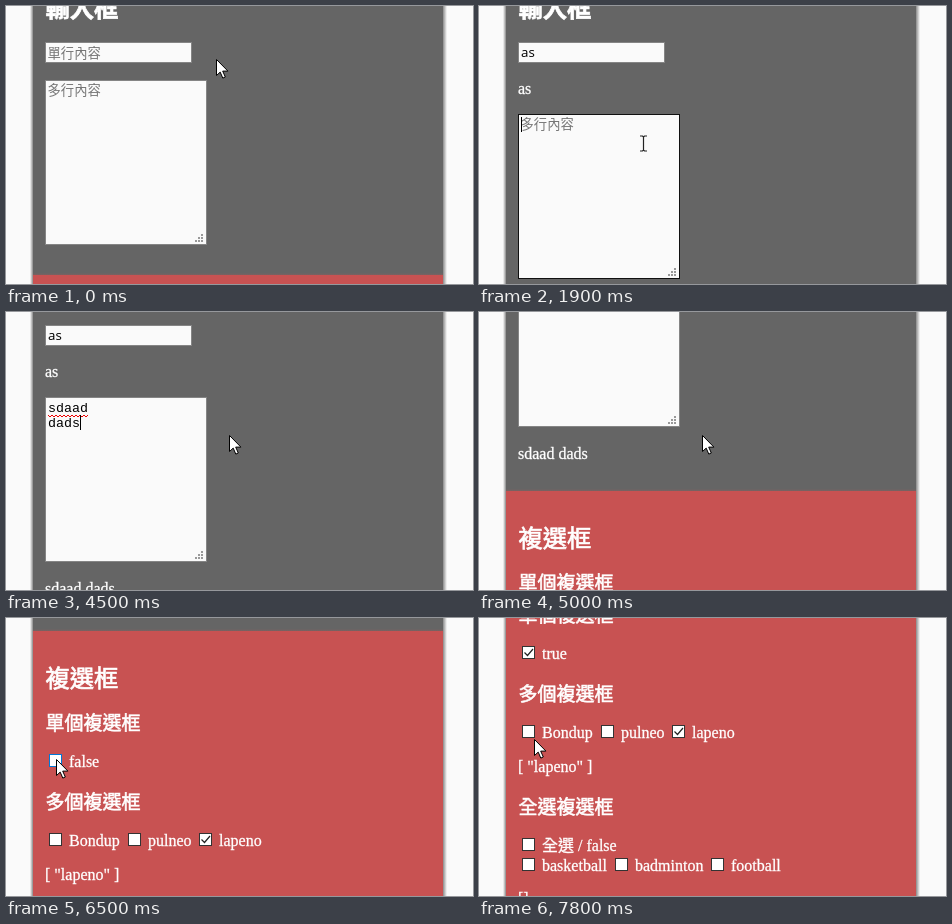
These frames come from a looping animation (467x278 px, 8000 ms). An HTML page:

```html
<!DOCTYPE html>
<html lang="zh-Hant">
<head>
<meta charset="utf-8">
<style>
html, body { margin: 0; width: 100%; height: 100%; overflow: hidden; background: #fafafa; }
svg { display: block; width: 467px; height: 278px; }
text { font: 16px 'Liberation Serif', 'Noto Sans CJK TC', 'Noto Sans CJK', serif; fill: #fff; stroke: #fff; stroke-width: .3px; white-space: pre; }
.h1 { font-size: 24.3px; stroke-width: .7px; }
.h3 { font-size: 19px; stroke-width: .6px; }
.hint { font: 13.33px 'Noto Sans CJK TC', 'Noto Sans CJK', sans-serif; fill: #757575; stroke: none; }
.one { font: 13.33px 'Open Sans', 'Noto Sans', sans-serif; fill: #000; stroke: none; }
.mono { font: 13.333px 'Liberation Mono', monospace; fill: #000; stroke: none; }
.field { fill: #fafafa; stroke: #858585; }
.box { fill: #fff; stroke: #333; }
.tick { fill: none; stroke: #222; stroke-width: 1.2; }
</style>
</head>
<body>
<svg viewBox="0 0 467 278">
  <defs>
    <linearGradient id="left"><stop offset="0" stop-color="#000" stop-opacity="0"/><stop offset="1" stop-color="#000" stop-opacity=".45"/></linearGradient>
    <linearGradient id="right"><stop offset="0" stop-color="#000" stop-opacity=".45"/><stop offset="1" stop-color="#000" stop-opacity="0"/></linearGradient>
    <linearGradient id="seam" x2="0" y2="1"><stop offset="0" stop-color="#c85252" stop-opacity="0"/><stop offset="1" stop-color="#c85252" stop-opacity=".25"/></linearGradient>
  </defs>
  <rect x="24" width="3" height="278" fill="url(#left)"/>
  <rect x="437" width="4" height="278" fill="url(#right)"/>
  <rect x="27" width="410" height="278" fill="#656565"/>
  <g id="page">
    <text class="h1" x="39.5" y="11" style="font-weight:600">輸入框</text>
    <rect id="input" class="field" x="39.5" y="36.5" width="146" height="20"/>
    <text id="inputHint" class="hint" x="41.5" y="52">單行內容</text>
    <text id="inputText" class="one" x="42" y="51"></text>
    <rect id="inputCaret" y="40" width="1" height="14"/>
    <text id="echo1" x="39" y="88"></text>
    <g id="area">
      <rect id="areaBox" class="field" x="39.5" y="74.5" width="161" height="164"/>
      <g id="grip" fill="#999"></g>
      <text id="areaHint" class="hint" x="41.5" y="89">多行內容</text>
      <text id="line1" class="mono" x="42" y="89"></text>
      <text id="line2" class="mono" x="42" y="104"></text>
      <path id="wave" fill="none" stroke="#e00" stroke-width="1"/>
      <rect id="areaCaret" width="1" height="15"/>
    </g>
    <text id="echo2" x="39" y="305"></text>
    <g id="red">
      <rect x="27" y="335" width="410" height="2" fill="url(#seam)"/>
      <rect x="27" y="337" width="410" height="500" fill="#c85252"/>
      <text class="h1" x="39.5" y="393">複選框</text>
      <text class="h3" x="39.5" y="436">單個複選框</text>
      <text id="single" x="63" y="473"></text>
      <text class="h3" x="39.5" y="514.5">多個複選框</text>
      <text x="39" y="586">[ "lapeno" ]</text>
      <text class="h3" x="39.5" y="627.5">全選複選框</text>
      <text x="39" y="718">[]</text>
    </g>
  </g>
  <path id="arrow" d="M0 0V16L3.7 12.6 6.3 18.6 8.8 17.5 6.2 11.6H11.4Z" fill="#fff" stroke="#000"/>
  <path id="beam" d="M-3.5-7.5H-1L0-6.5 1-7.5H3.5M0-6.5V6.5M-3.5 7.5H-1L0 6.5 1 7.5H3.5" fill="none" stroke="#222" stroke-width="1.2"/>
</svg>
<script>
const LOOP = 8000, STEP = 100, PARA = 34;
const $ = id => document.getElementById(id);

function add(parent, tag, attrs, text) {
  const el = document.createElementNS('http://www.w3.org/2000/svg', tag);
  for (const k in attrs) el.setAttribute(k, attrs[k]);
  if (text) el.textContent = text;
  return parent.appendChild(el);
}
const move = (el, x, y) => el.setAttribute('transform', `translate(${x} ${y})`);
const show = (el, on) => el.setAttribute('visibility', on ? 'visible' : 'hidden');

function checkbox(x, base, label, on) {
  const red = $('red');
  const box = add(red, 'rect', { class: 'box', x: x + .5, y: base - 12.5, width: 12, height: 12 });
  const tick = add(red, 'path', { class: 'tick', d: `M${x + 2.5} ${base - 6.5}l3 3 5.5-6.5` });
  show(tick, on);
  if (label) add(red, 'text', { x: x + 20, y: base }, label);
  return { box, tick };
}

const single = checkbox(43, 473);
checkbox(43, 552, 'Bondup');
checkbox(122, 552, 'pulneo');
checkbox(193, 552, 'lapeno', true);
checkbox(43, 665, '全選 / false');
checkbox(43, 685, 'basketball');
checkbox(136, 685, 'badminton');
checkbox(232, 685, 'football');

for (let r = 0; r < 3; r++)
  for (let c = 2 - r; c < 3; c++)
    add($('grip'), 'rect', { x: 189 + c * 3, y: 228 + r * 3, width: 2, height: 2 });

let zig = 'M42 92';
for (let i = 0; i < 20; i++) zig += `l2 ${i % 2 ? -2 : 2}`;
$('wave').setAttribute('d', zig);

// keys: [time, value, ...]
function track(keys, t) {
  let i = 0;
  while (i < keys.length - 2 && t >= keys[i + 1][0]) i++;
  const [a, b] = [keys[i], keys[i + 1]];
  const k = Math.max(0, Math.min(1, (t - a[0]) / (b[0] - a[0])));
  return a.slice(1).map((v, n) => v + (b[n + 1] - v) * k);
}
const typed = (word, times, t) => word.slice(0, times.filter(at => t >= at).length);
const snap = v => Math.floor(v) + .5;

const scrollKeys = [[4400, 0], [4500, 23], [5000, 158], [5500, 255], [5900, 324], [6900, 324], [7400, 432]];
const mouseKeys = [
  [0, 210, 53], [300, 188, 51], [600, 167, 50], [1200, 167, 50], [1600, 151, 145],
  [1700, 151, 145], [1900, 164, 137], [2100, 171, 130], [2200, 171, 130], [2300, 172, 127],
  [3600, 172, 127], [4200, 223, 123], [5400, 223, 123], [5500, 224, 122],
  [5700, 224, 122], [6200, 51, 139], [6300, 50, 141], [6900, 50, 141],
  [7500, 58, 130], [7600, 58, 130], [7800, 55, 121]
];

function draw(now) {
  const t = Math.floor(now % LOOP / STEP) * STEP;
  const one = typed('as', [1100, 1200], t);
  const l1 = typed('sdaad', [2500, 2600, 2700, 2800, 3000], t);
  const l2 = typed('dads', [3300, 3400, 3500, 3700], t);
  const newline = t >= 3200;
  const inFocus = t >= 600 && t < 1600;
  const areaFocus = t >= 1600 && t < 4200;
  const shift = one ? PARA : 0;
  const [scroll] = track(scrollKeys, t);
  const [mx, my] = track(mouseKeys, t).map(snap);

  move($('page'), 0, -Math.round(scroll));
  move($('area'), 0, shift);
  move($('red'), 0, shift + (l1 ? PARA : 0) - 2 * PARA);

  $('input').style.stroke = inFocus ? '#101010' : '';
  $('inputText').textContent = $('echo1').textContent = one;
  show($('inputHint'), !one);
  show($('inputCaret'), inFocus);
  $('inputCaret').setAttribute('x', [42, 49, 56][one.length]);

  $('areaBox').style.stroke = areaFocus ? '#101010' : '';
  $('line1').textContent = l1;
  $('line2').textContent = l2;
  $('echo2').textContent = l1 + (l2 && ' ' + l2);
  show($('areaHint'), !l1);
  show($('wave'), newline);
  show($('areaCaret'), t >= 1600 && t < 4900);
  $('areaCaret').setAttribute('x', 42 + 8 * (newline ? l2 : l1).length);
  $('areaCaret').setAttribute('y', newline ? 92 : 77);

  const on = t < 6500 || t >= 6800;
  $('single').textContent = String(on);
  show(single.tick, on);
  single.box.style.stroke = t >= 6300 && t < 7000 ? '#0078d7' : '';

  const beam = t >= 400 && t < 3900 && mx < 200;
  show($('beam'), beam);
  show($('arrow'), !beam);
  move($('beam'), mx, my);
  move($('arrow'), mx, my);
}

let start;
function tick(now) {
  start ??= now;
  draw(now - start);
  requestAnimationFrame(tick);
}
draw(0);
requestAnimationFrame(tick);
</script>
</body>
</html>
```
